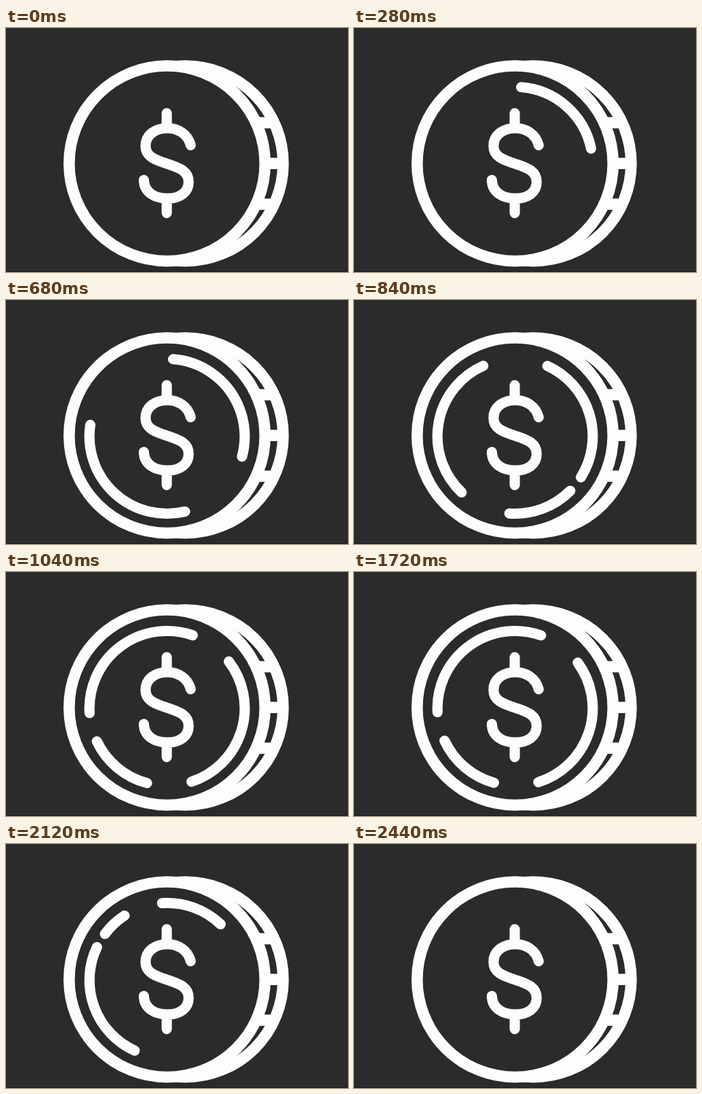
An HTML page for the animation above (3000 ms loop, 500x358 px).

```html
<!DOCTYPE html>
<html lang="en">
<head>
<meta charset="utf-8">
<title>Coin</title>
<style>
  html, body { margin: 0; width: 100%; height: 100%; overflow: hidden; background: #2b2b2b; }
  svg { display: block; width: 100vw; height: 100vh; }
  .line { fill: none; stroke: #fdfdfd; stroke-width: 15; stroke-linecap: round; stroke-linejoin: round; }
  .rim { fill: #2b2b2b; stroke: #fdfdfd; stroke-width: 16.5; }
  .ridge { stroke: #fdfdfd; stroke-width: 16.5; }
</style>
</head>
<body>
<svg viewBox="0 0 500 358">
  <rect y="357" width="500" height="1" fill="#191919"/>
  <circle class="rim" cx="262" cy="198.8" r="143.2"/>
  <path class="ridge" d="M355 139H386M375 198.8H405M355 258.6H386"/>
  <circle class="rim" cx="235.5" cy="198.8" r="143.2"/>
  <path class="line" d="M235 125V146M235 250V271.5
    M270 172C266 156 252 147 236 147C218 147 204 157 204 173C204 190 221 194 235 199
    C252 205 267 209 267 226C267 241 254 250 236 250C217 250 202 241 201.500 223"/>
  <path class="line" id="arcs"/>
</svg>
<script>
const LOOP = 3000, STEP = 40;
const CX = 235.5, CY = 200, R = 113.5;
const START = 4.5, END = 440;      // degrees clockwise from the top
const LEAVE = 1690;

// Each end of an arc: [time, angle] keys for the entry, then how long its exit takes.
const arcs = [
  { tail: { keys: [[280, START], [560, 118], [680, 166.6], [1040, 266.5]], out: 614 },
    head: { keys: [[0, START], [280, 78.3], [560, 231], [680, 278.5], [1040, 379.3]], out: 706 } },
  { tail: { keys: [[560, START], [680, 58], [1040, 195]], out: 657 },
    head: { keys: [[470, START], [680, 105.2], [1040, 244.7]], out: 687 } },
  { tail: { keys: [[680, START], [1040, 52.7]], out: 713 },
    head: { keys: [[560, START], [680, 66], [1040, 161.6]], out: 639 } }
];

// Smooth curve through the keys, at rest at both ends.
function ease(keys, t) {
  const last = keys.length - 1;
  if (t <= keys[0][0]) return keys[0][1];
  if (t >= keys[last][0]) return keys[last][1];
  const slope = k => k === 0 || k === last ? 0 :
    (keys[k + 1][1] - keys[k - 1][1]) / (keys[k + 1][0] - keys[k - 1][0]);
  const i = keys.findIndex(k => k[0] > t) - 1;
  const [t0, a] = keys[i], [t1, b] = keys[i + 1];
  const d = t1 - t0, u = (t - t0) / d, v = 1 - u;
  return a * v * v * (1 + 2 * u) + b * u * u * (3 - 2 * u)
    + d * u * v * (slope(i) * v - slope(i + 1) * u);
}

function angleAt(end, t) {
  const a = ease(end.keys, t);
  const p = Math.min(1, Math.max(0, t - LEAVE) / end.out);
  return a + (END - a) * p ** 1.85;
}

function point(deg) {
  const r = deg * Math.PI / 180;
  return (CX + R * Math.sin(r)).toFixed(2) + ' ' + (CY - R * Math.cos(r)).toFixed(2);
}

function arcPath(arc, t) {
  const from = angleAt(arc.tail, t), to = angleAt(arc.head, t);
  if (to - from < 0.2) return '';
  const large = to - from > 180 ? 1 : 0;
  return `M${point(from)}A${R} ${R} 0 ${large} 1 ${point(to)}`;
}

const path = document.getElementById('arcs');
const began = performance.now();

function draw() {
  const t = Math.floor((performance.now() - began) % LOOP / STEP) * STEP;
  path.setAttribute('d', arcs.map(arc => arcPath(arc, t)).join(''));
  requestAnimationFrame(draw);
}
draw();
</script>
</body>
</html>
```
